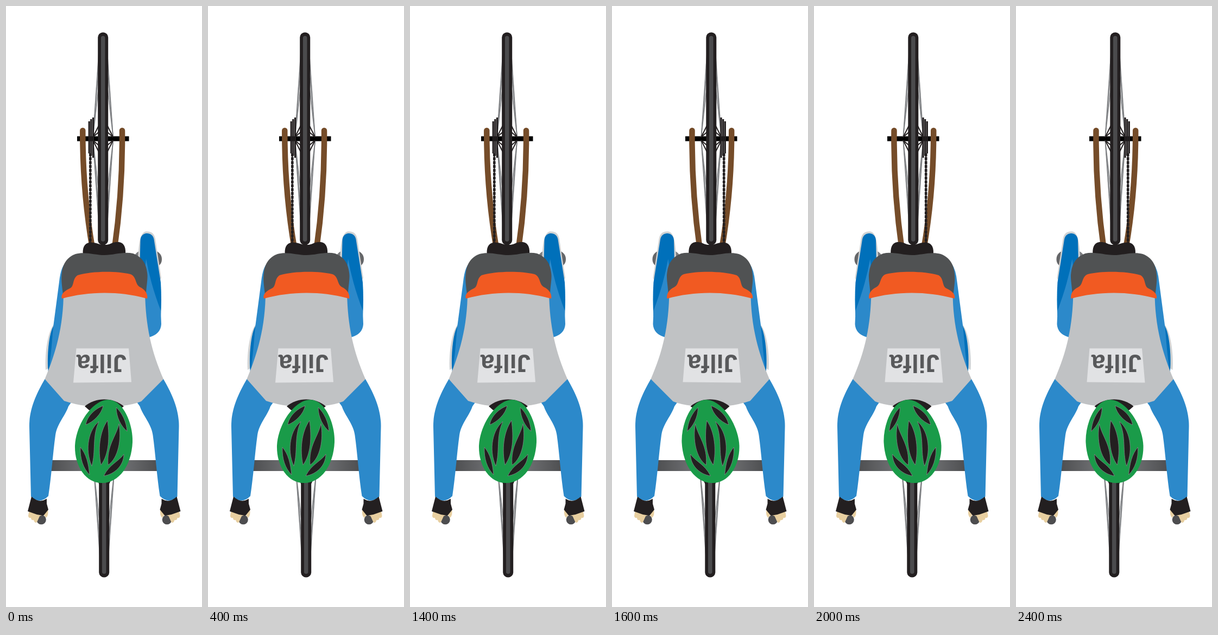
Animation of 361 by 1105 pixels, one loop 2600 ms. Source, as an HTML page:

```html
<!DOCTYPE html>
<html lang="en">
<head>
<meta charset="utf-8">
<title>Cyclist from above</title>
<style>
  html, body { margin: 0; width: 100%; height: 100%; overflow: hidden; background: #fff; }
  svg { display: block; width: 100%; height: 100%; }
  text { font: bold 46px "Liberation Sans", Arial, sans-serif; fill: #58595b; }
  .black { fill: #231f20; }
  .blue { fill: #2c89ca; }
  .navy { fill: #0070ba; }
  .shoe { fill: #d1d3d4; }
</style>
</head>
<body>
<svg viewBox="0 0 361 1105">
  <defs>
    <linearGradient id="metal">
      <stop offset="0" stop-color="#808184"/>
      <stop offset="1" stop-color="#636466"/>
    </linearGradient>
    <linearGradient id="bar">
      <stop offset="0" stop-color="#4d4e50"/>
      <stop offset=".5" stop-color="#808184"/>
      <stop offset="1" stop-color="#4d4e50"/>
    </linearGradient>

    <!-- Wheel centred on its hub -->
    <g id="wheel">
      <g id="spokes" fill="none"></g>
      <rect class="black" x="-9.5" y="-195.5" width="19" height="391" rx="9.2"/>
      <rect x="-3.8" y="-189" width="7.6" height="378" rx="3.8" fill="#4b4b4d"/>
    </g>

    <g id="arm">
      <path class="blue" d="M71.500 686 L90 680 L130 715 L115 736 C109 754 94 768 91 789 C86 825 84 862 78 901 Q62 917 46 902 L43 775 C42 741 57 711 71.500 686Z"/>
      <circle cx="65" cy="944.500" r="8.800" fill="#4d4d4f"/>
      <path fill="#e8cfa0" d="M43 926 L41 937 Q41 942 46 941 Q46 946 51 945 Q53 952 57 949 L62 938 L69 935 L74 941 Q79 936 77 925Z"/>
      <path class="black" d="M47 902 Q61 915 75 906 L75 915 L78 926 L69 937 L57 935 L40 929Z"/>
    </g>
  </defs>

  <g id="rider">
    <!-- Rear wheel and drivetrain -->
    <path d="M131 244H226.500" stroke="#000" stroke-width="9"/>
    <use href="#wheel" x="178.700" y="244"/>
    <g fill="none" stroke="#754c29" stroke-width="10.500" stroke-linecap="round">
      <path d="M141.300 229 Q141 340 159 445"/>
      <path d="M214 229 Q215 340 200 445"/>
    </g>
    <g fill="none" stroke="#231f20">
      <path d="M160.500 205V279M156.800 208V275M153.200 212V271" stroke-width="3.200"/>
      <path d="M155.300 271V440" stroke-width="4.600" stroke-dasharray="5.500 1.600"/>
      <path d="M155.300 271V440" stroke-width="2"/>
    </g>

    <!-- Front wheel and handlebar -->
    <use href="#wheel" x="180.700" y="855"/>
    <rect x="80" y="835" width="201" height="20" fill="url(#bar)"/>

    <!-- Legs -->
    <rect x="235.500" y="450" width="51.500" height="31" rx="15" fill="url(#metal)"/>
    <path class="shoe" d="M242.500 480 C244 450 244 416 258 414.500 C269 414 273 419 275 428 L286 500 L262 540Z"/>
    <path class="navy" d="M246.500 470 L247.500 431 C248 414 270 414 272.500 429 L285 508 Q287 540 285 570 L255 570Z"/>
    <path class="blue" d="M258 465 Q266 510 285 560 L286 585 Q285 603 264 609 L248 560Z"/>
    <path class="shoe" d="M90 584 C77 594 71 639 73 669 L88 660Z"/>
    <path class="navy" d="M89 586 C78 600 75 650 78 674 L95 640Z"/>
    <path class="blue" d="M113 469 Q101 477 98 507 L87 590 Q84 630 79 671 L125 610V475Z"/>

    <!-- Body -->
    <path class="black" d="M142 460 C140 445 144 436 154 435 C167 434 168 439 181 439 C195 439 194 433 208 434 C219 436 221 445 220 460Z"/>
    <use href="#arm"/>
    <use href="#arm" transform="translate(361.500) scale(-1 1)"/>
    <path fill="#c0c2c4" d="M106 525 C106 590 91 640 71.500 686 L107 726 Q128 733 147 735 Q181 720 214 735 Q234 733 249 727 L290 686 C268 635 257 590 256 525Z"/>
    <path fill="#505253" d="M105 531 C103 513 101 502 103 490 C105 471 115 461 128 456 C145 451 164 458 181 458 C199 458 217 451 234 455 C248 460 258 471 260 490 C262 502 258 515 258 531 Q181 505 105 531Z"/>
    <path fill="#f15a22" d="M103 538 C100 530 108 524 116 520 C127 516 121 502 132 495 C158 487 204 487 229 493 C241 497 237 512 247 517 C256 521 262 530 260 538 C210 524 153 524 103 538Z"/>
    <path fill="#e1e2e4" d="M129.500 629.500 H226 L231 691.500 L124 692.500Z"/>

    <!-- Helmet -->
    <path class="black" d="M145 736 C165 719 197 719 217 736 L207 743 H153Z"/>
    <path fill="#1a9b49" d="M188 724 C216 724 234 768 233 802 C231 845 208 877 177 877 C146 877 126 845 127 808 C129 768 160 724 188 724Z"/>
    <g class="black" stroke="#85878a" stroke-width=".8">
      <path d="M179 735 C162 741 148 757 147 770 C162 764 176 750 179 735Z"/>
      <path d="M203 738 C203 756 212 773 223 782 C222 765 214 748 203 738Z"/>
      <path d="M171 764 C153 778 144 814 158 846 C166 818 158 793 171 764Z"/>
      <path d="M187 762 C172 783 169 817 175 844 C190 823 191 793 187 762Z"/>
      <path d="M208 768 C203 792 185 808 188 844 C207 831 213 797 208 768Z"/>
      <path d="M137 811 C136 832 142 850 154 862 C152 841 148 824 137 811Z"/>
      <path d="M217 824 C207 838 190 843 180 864 C200 861 217 845 217 824Z"/>
    </g>
  </g>
  <text id="name">Jilfa</text>
</svg>
<script>
  const spokes = document.getElementById('spokes');
  const addSpoke = (side, end, rimY, color, width) => {
    spokes.innerHTML +=
      `<path d="M${side * 18.5} ${end * 3}L${side * 7} ${end * rimY}" stroke="${color}" stroke-width="${width}"/>`;
  };
  for (const side of [-1, 1]) {
    for (const end of [-1, 1]) {
      for (const rimY of [170, 140, 105]) addSpoke(side, end, rimY, '#808285', 1.5);
      for (const rimY of [26, 13]) addSpoke(side, end, rimY, '#231f20', 2);
    }
  }

  const LOOP = 2600;
  const FLIPS = [200, 400, 900, 1400, 1600, 1800, 2000, 2200, 2400];
  const rider = document.getElementById('rider');
  const nameTag = document.getElementById('name');

  function draw() {
    const t = performance.now() % LOOP;
    const mirrored = FLIPS.filter(flip => flip <= t).length % 2 === 1;
    rider.setAttribute('transform', mirrored ? 'translate(361.5) scale(-1 1)' : '');
    nameTag.setAttribute('transform', `translate(${mirrored ? 231 : 222} 641) rotate(180)`);
    requestAnimationFrame(draw);
  }
  draw();
</script>
</body>
</html>
```
